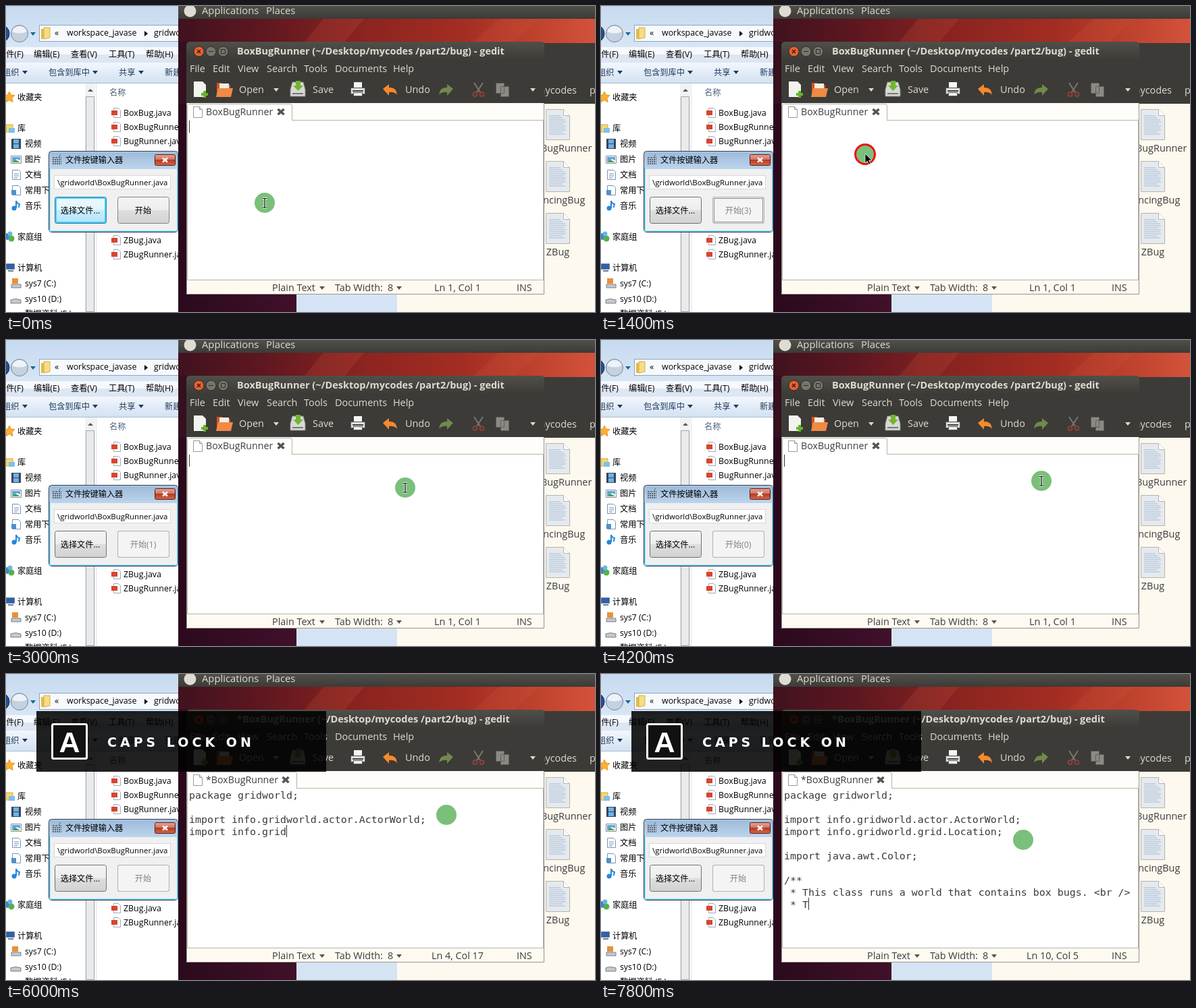
Recreate the animation shown at these times as an HTML page. Size 872 by 454 pixels, loop 8000 ms.

```html
<!DOCTYPE html>
<html lang="zh-CN">
<head>
<meta charset="utf-8">
<title>Typing a file into an editor</title>
<style>
html, body { margin: 0; width: 100%; height: 100%; overflow: hidden; background: #fff; }
svg { display: block; }
text { white-space: pre; font-family: "Open Sans", "Noto Sans CJK SC", sans-serif; }
.win { font-size: 12.2px; fill: #000; }
.gtk { font-size: 14.4px; fill: #dfdbd2; }
.dark { fill: #3c3c3c; }
.mid { text-anchor: middle; }
#code text { font: 14.95px "DejaVu Sans Mono", monospace; fill: #3a3a3a; }

/* Every change lands on a 200 ms step, 2.5% of the loop. */
.anim { animation: 8s step-end infinite; }
#pointer { animation-name: move; }
#ring { animation-name: click; }
#arrow { animation-name: arrow; }
#beam { animation-name: beam; }
#overlay { animation-name: overlay; }
#glow { animation-name: glow; }
#hover { animation-name: hover; }
#disabled { animation-name: disabled; }
#focus { animation-name: focus; }
@keyframes move {
  0% { transform: translate(383px, 292px); }
  2.5% { transform: translate(362px, 295px); }
  5% { transform: translate(290px, 304px); }
  7.5% { transform: translate(225px, 309px); }
  10% { transform: translate(205px, 310px); }
  15% { transform: translate(300px, 266px); }
  17.5% { transform: translate(391px, 220px); }
  25% { transform: translate(394px, 220px); }
  27.5% { transform: translate(406px, 220px); }
  30% { transform: translate(427px, 220px); }
  32.5% { transform: translate(480px, 220px); }
  35% { transform: translate(543px, 219px); }
  37.5% { transform: translate(591px, 219px); }
  40% { transform: translate(609px, 217px); }
  42.5% { transform: translate(622px, 214px); }
  45% { transform: translate(631px, 213px); }
  47.5% { transform: translate(642px, 211px); }
  50% { transform: translate(649px, 210px); }
  52.5% { transform: translate(652px, 209px); }
  85% { transform: translate(650px, 211px); }
  87.5% { transform: translate(644px, 215px); }
  90% { transform: translate(640px, 228px); }
  92.5% { transform: translate(634px, 237px); }
  95% { transform: translate(628px, 243px); }
  97.5%, to { transform: translate(625px, 246px); }
}
@keyframes click { 0%, 15%, 20%, to { opacity: 0; } 12.5%, 17.5% { opacity: 1; } }
@keyframes arrow { 0%, 20%, to { opacity: 0; } 5% { opacity: 1; } }
@keyframes beam { 0%, 20% { opacity: 1; } 5%, 62.5%, to { opacity: 0; } }
@keyframes overlay { 0% { opacity: 0; } 72.5%, to { opacity: 1; } }
@keyframes glow { 0% { opacity: 1; } 12.5%, to { opacity: 0; } }
@keyframes hover { 0%, 12.5%, to { opacity: 0; } 7.5% { opacity: 1; } }
@keyframes disabled { 0% { opacity: 0; } 12.5%, to { opacity: 1; } }
@keyframes focus { 0%, 20%, to { opacity: 0; } 12.5% { opacity: 1; } }
</style>
</head>
<body>
<svg width="872" height="454" viewBox="0 0 872 454">
<defs>
  <linearGradient id="wall"><stop stop-color="#40121f"/><stop offset=".2" stop-color="#5e1720"/><stop offset=".45" stop-color="#8c2420"/><stop offset=".68" stop-color="#a32d22"/><stop offset=".85" stop-color="#bd412d"/><stop offset="1" stop-color="#d4523a"/></linearGradient>
  <linearGradient id="floor"><stop stop-color="#2b0a1d"/><stop offset="1" stop-color="#40102a"/></linearGradient>
  <linearGradient id="bar" x2="0" y2="1"><stop stop-color="#504f4a"/><stop offset="1" stop-color="#3c3b37"/></linearGradient>
  <linearGradient id="glass" x2="0" y2="1"><stop stop-color="#c6daef"/><stop offset="1" stop-color="#d8e6f5"/></linearGradient>
  <linearGradient id="caption" x2="0" y2="1"><stop stop-color="#9dbbdb"/><stop offset="1" stop-color="#bdd4ec"/></linearGradient>
  <linearGradient id="tools" x2="0" y2="1"><stop stop-color="#f3f7fc"/><stop offset=".5" stop-color="#e2ecf7"/><stop offset="1" stop-color="#d3e1f1"/></linearGradient>
  <linearGradient id="grey" x2="0" y2="1"><stop stop-color="#f4f4f4"/><stop offset=".49" stop-color="#ededed"/><stop offset=".5" stop-color="#dedede"/><stop offset="1" stop-color="#d2d2d2"/></linearGradient>
  <linearGradient id="blue" x2="0" y2="1"><stop stop-color="#f0fafe"/><stop offset=".49" stop-color="#e0f4fd"/><stop offset=".5" stop-color="#c8ecfc"/><stop offset="1" stop-color="#b4e4fa"/></linearGradient>
  <linearGradient id="red" x2="0" y2="1"><stop stop-color="#e6a596"/><stop offset=".49" stop-color="#d0705c"/><stop offset=".5" stop-color="#b93a22"/><stop offset="1" stop-color="#d06a4c"/></linearGradient>
  <clipPath id="nav"><path d="M0 0H117V454H0z"/></clipPath>
  <clipPath id="left"><path d="M0 0H255V454H0z"/></clipPath>
  <path id="down" d="M-4-2H4L0 3z"/>
  <g id="source">
    <path d="M3.500.5h7l3 3v11h-10z" fill="#fff" stroke="#9aa9c0"/>
    <rect y="4" width="9" height="7" fill="#d9442c"/>
  </g>
  <g id="doc">
    <path d="M.5.5h26l9 9v36H.5z" fill="#e6eaee" stroke="#b3b5b2"/>
    <path d="M26.5.5v9h9" fill="#fff" stroke="#b3b5b2"/>
    <path d="M5 10h17M5 13h20M5 16h24M5 19h25M5 22h22M5 25h25M5 28h24M5 31h25M5 34h20M5 37h24" stroke="#a3b9d4"/>
  </g>
  <g id="page"><path d="M.5.5h9l4 4v12H.5z" fill="#fff" stroke="#999"/><path d="M9.5.5v4h4" fill="#ddd" stroke="#999"/></g>
</defs>

<!-- File explorer -->
<g clip-path="url(#left)">
  <rect width="255" height="454" fill="#fff"/>
  <rect width="255" height="62" fill="url(#glass)"/>
  <circle cx="-8" cy="41" r="13" fill="#244f92" stroke="#17335f"/>
  <circle cx="20" cy="41" r="12.5" fill="#c6d1df" stroke="#76859a"/>
  <path d="M9 38a11.500 11.500 0 0 1 22 0q-11 5-22 0" fill="#eef3f9"/>
  <use href="#down" x="40" y="41" fill="#146a94"/>
  <rect x="49.5" y="28.500" width="220" height="24" fill="#f7fafd" stroke="#8fa5bf"/>
  <path d="M52 34h5l2 2v13h-7z" fill="#e4bb4c"/><path d="M56 32h9v15l-9 2z" fill="#f6dc86" stroke="#d9ae45"/>
  <g class="win" style="font-size:12.4px"><text x="72" y="44">«</text><text x="90" y="44">workspace_javase</text><text x="219" y="44">gridworld</text></g>
  <path d="M205 37l5 4-5 4z"/>
  <rect y="61" width="255" height="23" fill="#f6f9fd"/><rect y="72" width="255" height="12" fill="#dde6f2"/>
  <g class="win"><text x="-12" y="76">文件(F)</text><text x="41" y="76">编辑(E)</text><text x="96" y="76">查看(V)</text><text x="152" y="76">工具(T)</text><text x="207" y="76">帮助(H)</text></g>
  <rect y="84" width="255" height="30" fill="url(#tools)"/><path d="M0 114.500H255" stroke="#a9bfd7"/>
  <g class="win" style="fill:#1e395b"><text x="-5" y="103">组织</text><text x="63" y="103">包含到库中</text><text x="167" y="103">共享</text><text x="235" y="103">新建</text></g>
  <g fill="#1e395b"><use href="#down" x="28" y="98"/><use href="#down" x="132" y="98"/><use href="#down" x="200" y="98"/></g>

  <g clip-path="url(#nav)">
    <path d="M5 127l2.500 5 5.500.6-4 4 1 6-5-3-5 3 1-6-4-4 5.500-.6z" fill="#fbb034" stroke="#e8921a"/>
    <path d="M0 176h10v11H0z" fill="#f5d877" stroke="#d5a93b"/><path d="M4 181h9v7H4z" fill="#7cc0ea"/>
    <path d="M8 197h14v15H8z" fill="#36465c"/><path d="M11 198h8v6h-8zM11 205h8v6h-8z" fill="#6fb2e4"/>
    <path d="M7.500 222.500h15v11h-15z" fill="#fff" stroke="#889"/><path d="M9 224h12v5l-5-2-7 5z" fill="#5ba7dc"/><path d="M9 232l5-4 7 4z" fill="#4c9b50"/>
    <path d="M9.500 243.500h9l3 3v11h-12z" fill="#fff" stroke="#7f92ab"/><path d="M12 249h7m-7 3h7m-7 3h5" stroke="#5f8bc0"/>
    <path d="M9.500 266.500h9l3 3v11h-12z" fill="#fff" stroke="#7f92ab"/><path d="M8 273h7v7H8z" fill="#4c91cf"/>
    <path d="M15 289v11m0-11q1 4 5 5-1 3-1 5" fill="none" stroke="#2788d8" stroke-width="2"/><circle cx="12" cy="300" r="3.500" fill="#2788d8"/>
    <circle cx="2" cy="342" r="5" fill="#3f86c9"/><circle cx="8" cy="345" r="4.500" fill="#56b04d"/><circle cx="6" cy="338" r="3.500" fill="#64b7e8"/>
    <path d="M.5 382.500h12v8H.5z" fill="#2f5fb0" stroke="#6b7d94"/><path d="M3 393h8" stroke="#6b7d94" stroke-width="2"/>
    <rect x="9" y="404" width="9" height="8" fill="#e8913a"/>
    <path d="M8 413h14v5H8zM7 436q7-3 15 0v5H7z" fill="#c4c9cf" stroke="#787e87"/>
    <g class="win">
      <text x="17" y="140">收藏夹</text><text x="17" y="186">库</text>
      <text x="28" y="209">视频</text><text x="28" y="232">图片</text><text x="28" y="255">文档</text><text x="28" y="278">常用下载</text><text x="28" y="301">音乐</text>
      <text x="17" y="347">家庭组</text><text x="17" y="393">计算机</text>
      <text x="28" y="416">sys7 (C:)</text><text x="28" y="439">sys10 (D:)</text><text x="28" y="461">数据资料 (E:)</text>
    </g>
  </g>
  <path d="M117 115h15v339h-15z" fill="#f1f2f3"/><path d="M121 127l4-4 4 4z" fill="#555"/>
  <path d="M118.500 134.500h12v319h-12z" fill="#e9eaec" stroke="#a0a4a9"/><path d="M133.500 115V454" stroke="#dbe3ec"/>
  <text class="win" x="153" y="133" style="fill:#4c607a">名称</text>
  <g class="win" style="font-size:12.4px">
    <text x="174" y="163">BoxBug.java</text><text x="174" y="184">BoxBugRunner.java</text><text x="174" y="205">BugRunner.java</text>
    <text x="174" y="352">ZBug.java</text><text x="174" y="373">ZBugRunner.java</text>
  </g>
  <use href="#source" x="156" y="151"/><use href="#source" x="156" y="172"/><use href="#source" x="156" y="193"/><use href="#source" x="156" y="340"/><use href="#source" x="156" y="361"/>
</g>

<!-- Dialog -->
<rect x="63.500" y="215.500" width="191" height="120" rx="4" fill="#b9d3ec" stroke="#2b3540"/>
<path d="M64.500 240V334.500H254V219" fill="none" stroke="#4cd2f2"/>
<rect x="65" y="217" width="189" height="25" fill="url(#caption)"/>
<path d="M66 242h187v91H66z" fill="#f0f0f0"/>
<path d="M69 225h4m1 0h3m1 0h4M69 228h13M69 231h13M69 234h13" stroke="#5b626b" stroke-width="2" stroke-dasharray="2 1"/><path d="M78 224l3-4" stroke="#5b626b"/>
<text class="win" x="88" y="233">文件按键输入器</text>
<rect x="220.500" y="220.500" width="30" height="16" rx="2" fill="url(#red)" stroke="#5b1c14"/>
<path d="M232 225.500l7 6m0-6l-7 6" stroke="#fff" stroke-width="2.400"/>
<rect x="71.500" y="251.500" width="172" height="20" fill="#fff" stroke="#d5d8dd"/>
<text class="win" x="76" y="266" style="font-size:11.400px">\gridworld\BoxBugRunner.java</text>
<rect x="72.500" y="283.500" width="76" height="39" rx="3" fill="url(#grey)" stroke="#707070"/>
<g id="glow" class="anim"><rect x="72.500" y="283.500" width="76" height="39" rx="3" fill="url(#blue)" stroke="#2c7da8"/><rect x="74" y="285" width="73" height="36" rx="2" fill="none" stroke="#42cdf5" stroke-width="2"/></g>
<text class="win mid" x="110" y="308">选择文件...</text>
<rect x="165.500" y="283.500" width="76" height="39" rx="3" fill="url(#grey)" stroke="#858585"/>
<rect id="hover" class="anim" x="165.500" y="283.500" width="76" height="39" rx="3" fill="url(#blue)" stroke="#3c7fb1"/>
<rect id="disabled" class="anim" x="165.500" y="283.500" width="76" height="39" rx="3" fill="#f4f4f4" stroke="#adb2b5"/>
<rect id="focus" class="anim" x="167.500" y="285.500" width="72" height="35" fill="none" stroke="#222" stroke-dasharray="1 1"/>
<text id="start" class="win mid" x="203" y="308">开始</text>

<!-- Desktop and file manager -->
<path d="M255 0H872V454H255z" fill="#2b0a1d"/>
<path d="M255 427H430V454H255z" fill="url(#floor)"/>
<path d="M255 19H872V145H255z" fill="url(#wall)"/>
<path d="M470 19h60l-30 36h-60zM730 19h60l-40 36h-60z" fill="#d0583f" opacity=".2"/>
<path d="M255 53h13v92h-13z" fill="#35101f"/>
<path d="M255 0H872V19H255z" fill="url(#bar)"/>
<circle cx="272.500" cy="7.500" r="9" fill="#dfdbd2"/>
<g class="gtk" style="font-size:14.800px"><text x="290" y="12">Applications</text><text x="385" y="12">Places</text></g>
<path d="M790 55H872V145H790z" fill="#3c3b37"/>
<path d="M579 145H872V454H579z" fill="#fef9ef"/><path d="M430 420H579V454H430z" fill="#d5e4f4"/>
<g class="gtk"><text x="845" y="130" text-anchor="end">mycodes</text><text x="864" y="130">part2</text></g>
<use href="#doc" x="799" y="153"/><use href="#doc" x="799" y="230"/><use href="#doc" x="799" y="307"/>
<g class="gtk mid"><text class="dark" x="817" y="216">BoxBugRunner</text><text class="dark" x="817" y="293">DancingBug</text><text class="dark" x="817" y="370">ZBug</text></g>

<!-- Editor -->
<path d="M267 143H797V428H267z" fill="#fffdf9"/>
<path d="M267 144V59q0-6 6-6H791q6 0 6 6V144z" fill="#3c3b37"/>
<path d="M267 80V59q0-6 6-6H791q6 0 6 6V80z" fill="url(#bar)"/>
<circle cx="285.500" cy="67.500" r="7.500" fill="#e9602f" stroke="#2b2a27"/><path d="M283 65l5 5m0-5l-5 5" stroke="#40200f" stroke-width="1.600"/>
<g fill="#77756c" stroke="#2b2a27"><circle cx="303.500" cy="67.500" r="7.500"/><circle cx="321.500" cy="67.500" r="7.500"/><path d="M300 67.500h7M318.500 64.500h6v6h-6z" fill="none"/></g>
<text id="title" class="gtk" x="342" y="72" style="font-weight:bold;font-size:14.500px"></text>
<g class="gtk">
  <text x="272" y="98">File</text><text x="306" y="98">Edit</text><text x="343" y="98">View</text><text x="386" y="98">Search</text><text x="441" y="98">Tools</text><text x="487" y="98">Documents</text><text x="573" y="98">Help</text>
  <text x="345" y="129">Open</text><text x="454" y="129">Save</text><text x="591" y="129">Undo</text>
</g>
<g fill="#dfdbd2"><use href="#down" x="400" y="124"/><use href="#down" x="780" y="124"/></g>
<path d="M278 112h13l5 5v18h-18z" fill="#f3f3ee"/><path d="M294 126v10m-5-5h10" stroke="#65b52c" stroke-width="4"/>
<path d="M312 114h8l2 3h10v17h-20z" fill="#d9531e"/><path d="M316 115h14v10h-14z" fill="#f1efe9"/><path d="M311 135l3-13h22l-3 13z" fill="#f08a45"/>
<path d="M421 124l3-11h16l3 11v10h-22z" fill="#d8d9d5" stroke="#8a8c88"/><path d="M429 111h7v7h4l-7.500 8-7.500-8h4z" fill="#73b52c"/><path d="M424 130h16" stroke="#777" stroke-width="2"/>
<path d="M515 113h12v9h-12z" fill="#f7f7f4"/><path d="M510.500 121.500h21v9h-21z" fill="#e0e0dc" stroke="#555"/><path d="M513 126h16" stroke="#444" stroke-width="2"/><path d="M514.500 128.500h13v5h-13z" fill="#f7f7f4" stroke="#555"/>
<path d="M558 123l9-7v5q11-1 12 11-4-5-12-4v5z" fill="#f58a2c"/>
<path d="M662 123l-9-7v5q-11-1-12 11 4-5 12-4v5z" fill="#6f8a4a"/>
<path d="M693 114l9 14m4-14l-9 14" stroke="#777670" stroke-width="2"/><g fill="none" stroke="#8d4038" stroke-width="2"><circle cx="694.500" cy="131" r="3"/><circle cx="704.500" cy="131" r="3"/></g>
<path d="M725.500 114.500h12v15h-12zM732.500 119.500h12v15h-12z" fill="#8b8a85" stroke="#5f5e5a"/>
<path d="M268.500 169.500H795.500V406.500H268.500z" fill="#fff" stroke="#b8b3ab"/>
<path id="tab" fill="#fff" stroke="#b8b3ab"/>
<use href="#page" x="277" y="149"/>
<text id="name" class="gtk dark" x="296" y="162" style="font-size:14.200px"></text>
<path id="close" d="M402.500 153l9 8m0-8l-9 8" stroke="#55554f" stroke-width="3.600"/>
<g id="code"></g>
<rect id="caret" width="1" height="18" fill="#333"/>
<path d="M268 407H796V428H268z" fill="#fffaf1"/><path d="M267.500 144V427.500H796.500V144" fill="none" stroke="#99948d"/>
<g class="gtk"><text class="dark" x="394" y="423">Plain Text</text><text class="dark" x="487" y="423">Tab Width:</text><text class="dark" x="565" y="423">8</text><text id="place" class="dark mid" x="668.500" y="423"></text><text class="dark" x="756" y="423">INS</text></g>
<g fill="#55554f"><use href="#down" x="468" y="418"/><use href="#down" x="582" y="418"/></g>

<!-- Caps Lock notice -->
<g id="overlay" class="anim">
  <path d="M45 55H474V145H45z" opacity=".87"/>
  <rect x="68.500" y="74.500" width="51" height="51" rx="2" fill="#111" stroke="#fff" stroke-width="3"/>
  <text class="mid" x="94" y="116" fill="#fff" style="font:bold 43px 'Liberation Sans',sans-serif">A</text>
  <text x="150" y="108" fill="#fff" style="font:bold 19px 'DejaVu Sans',sans-serif;letter-spacing:5px">CAPS LOCK ON</text>
</g>

<!-- Highlighted pointer -->
<g id="pointer" class="anim">
  <circle r="15" fill="#7abf7a"/>
  <circle id="ring" class="anim" r="14.500" fill="none" stroke="#f00c0c" stroke-width="3"/>
  <path id="arrow" class="anim" d="M0-1V13l3.200-3 2.300 5 2.400-1-2.300-5H10z" stroke="#fff" stroke-width=".7"/>
  <g id="beam" class="anim" fill="none">
    <path id="stem" d="M-3.500-6.500h2.500q1 0 1 1 0-1 1-1h2.500M0-5.500V6M-3.500 7h2.500Q0 7 0 6q0 1 1 1h2.500" stroke="#fff" stroke-width="3"/>
    <path d="M-3.500-6.500h2.500q1 0 1 1 0-1 1-1h2.500M0-5.500V6M-3.500 7h2.500Q0 7 0 6q0 1 1 1h2.500" stroke="#000" stroke-width="1.200"/>
  </g>
</g>
</svg>
<script>
const LOOP = 8000, STEP = 200, CHAR = 9, LINE = 18;
const source = `package gridworld;

import info.gridworld.actor.ActorWorld;
import info.gridworld.grid.Location;

import java.awt.Color;

/**
 * This class runs a world that contains box bugs. <br />
 * T`;
const pace = [[4800, 0], [5600, 50], [7000, 140], [7800, 188]];
const byId = id => document.getElementById(id);

const rows = source.split('\n').map((_, i) => {
  const row = document.createElementNS('http://www.w3.org/2000/svg', 'text');
  row.setAttribute('x', 271);
  row.setAttribute('y', 185 + i * LINE);
  return byId('code').appendChild(row);
});

function typedCount(t) {
  if (t <= pace[0][0]) return 0;
  const i = pace.findIndex(([time]) => t <= time);
  const [t0, n0] = pace[i - 1], [t1, n1] = pace[i];
  return Math.round(n0 + (n1 - n0) * (t - t0) / (t1 - t0));
}

function startLabel(t) {
  return t < 1000 || t >= 5000 ? '开始' : `开始(${4 - Math.floor(t / 1000)})`;
}

function render(t) {
  const count = typedCount(t), dirty = count > 0;
  const lines = source.slice(0, count).split('\n');
  const line = lines.length - 1, col = lines[line].length;
  const name = (dirty ? '*' : '') + 'BoxBugRunner';
  const shift = dirty ? 7 : 0;

  rows.forEach((row, i) => { row.textContent = lines[i] || ''; });
  byId('caret').setAttribute('x', 271 + col * CHAR);
  byId('caret').setAttribute('y', 170 + line * LINE);
  byId('caret').style.opacity = dirty || (t + 600) % 1200 < 800 ? 1 : 0;
  byId('place').textContent = `Ln ${line + 1}, Col ${col + 1}`;
  byId('title').textContent = name + ' (~/Desktop/mycodes /part2/bug) - gedit';
  byId('name').textContent = name;
  byId('tab').setAttribute('d', `M268.5 170V148q0-2.500 3-2.500H${421 + shift}q2.500 0 2.500 2.500V170`);
  byId('close').setAttribute('transform', `translate(${shift})`);
  byId('start').textContent = startLabel(t);
  byId('start').style.fill = t < 1000 ? '#000' : '#838383';
}

let begin, last;
function tick(now) {
  begin ??= now;
  const t = Math.floor((now - begin) % LOOP / STEP) * STEP;
  if (t !== last) render(last = t);
  requestAnimationFrame(tick);
}
render(0);
requestAnimationFrame(tick);
</script>
</body>
</html>
```
